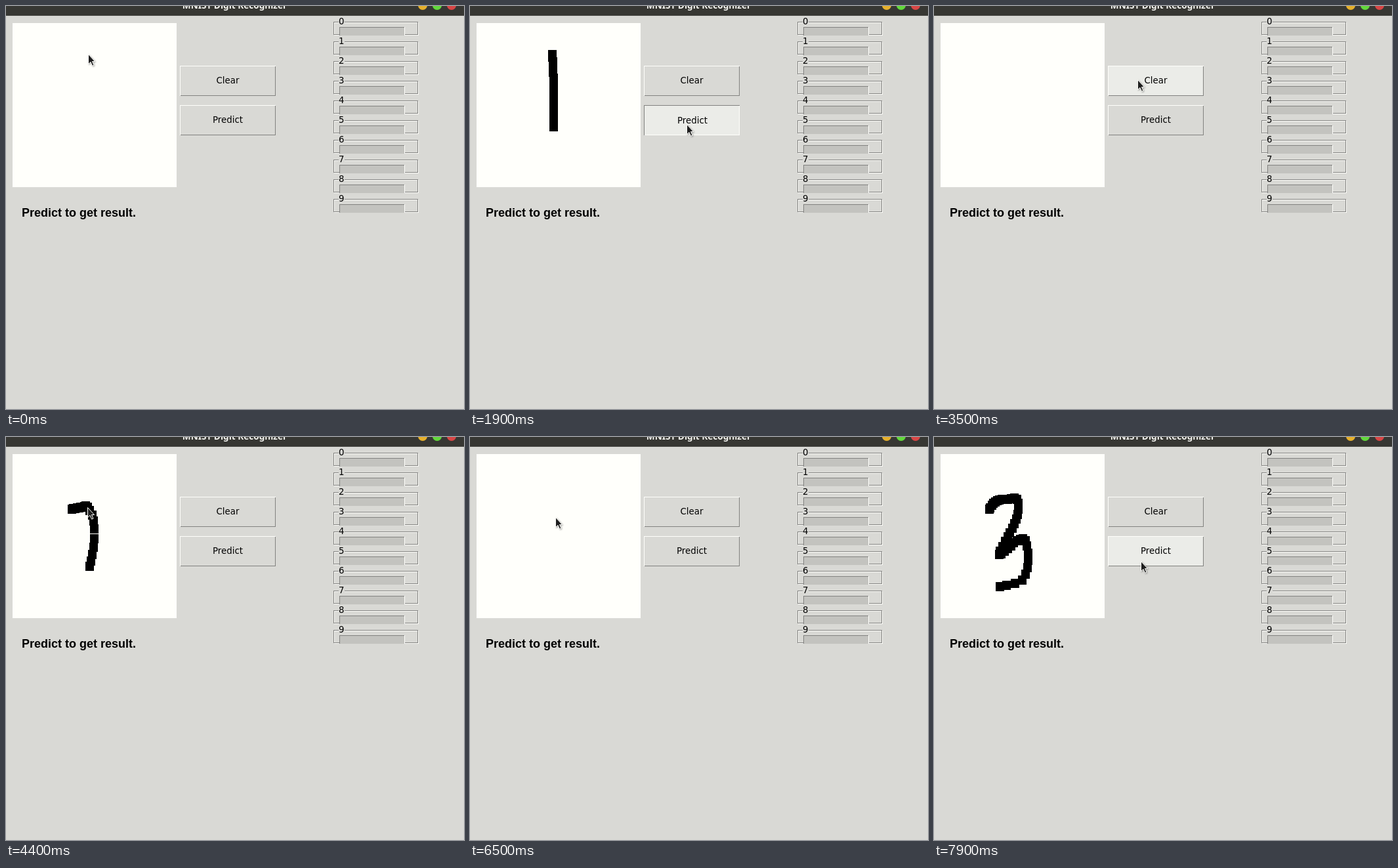
An HTML page that plays this animation: 698 by 614 pixels, repeating every 8000 ms.

```html
<!DOCTYPE html>
<html lang="en">
<head>
<meta charset="utf-8">
<title>MNIST Digit Recognizer</title>
<style>
  html, body { margin: 0; width: 100%; height: 100%; overflow: hidden; background: #d9d9d5; }
  svg { display: block; width: 698px; height: 614px; shape-rendering: crispEdges; }
  text { font: 13.33px "DejaVu Sans", sans-serif; fill: #000; }
  .mid { text-anchor: middle; }
  .title { font: 700 13.6px "Noto Sans", "Open Sans", sans-serif; fill: #f4f4f0; }
  .result { font: 700 18px "Liberation Sans", Arial, sans-serif; }
  .smooth { shape-rendering: geometricPrecision; }
  .dark { fill: #828280; }
  .light { fill: #fffffb; }
  .face { fill: #d9d9d5; }
  .trough { fill: #c3c3bf; }
  .hover .face, .down .face { fill: #ebece8; }
  .down .dark { fill: #fffffb; }
  .down .light { fill: #828280; }
  .down text { transform: translate(1px, 1px); }
  .bar { fill: #4a6984; }
  .bar-light { fill: #8fa4b6; }
  .bar-dark { fill: #25364a; }
  #cursor { filter: drop-shadow(1px 1px 1px rgba(0, 0, 0, .35)); }
</style>
</head>
<body>
<svg viewBox="0 0 698 614">
  <rect width="698" height="614" fill="#d9d9d5"/>
  <rect width="698" height="15" fill="#373733"/>
  <rect y="14" width="698" height="1" fill="#4a4a46"/>
  <text class="title mid" x="348.5" y="4">MNIST Digit Recognizer</text>
  <g class="smooth">
    <circle cx="635" cy="-1" r="7" fill="#e6b02c"/>
    <circle cx="657" cy="-1" r="7" fill="#62d83c"/>
    <circle cx="679" cy="-1" r="7" fill="#d84646"/>
  </g>
  <rect x="10" y="26" width="250" height="250" fill="#fffffb"/>
  <path id="ink"/>
  <g id="buttons"></g>
  <text id="result" class="result mid" x="111" y="321"></text>
  <g id="bars"></g>
  <path id="cursor" class="smooth" fill="#1e1e1e" stroke="#fffffb" stroke-linejoin="round"
        d="M.5 .5V15.6L4 12.4 6.6 18.2 9 17.2 6.5 11.5H10.6Z"/>
</svg>
<script>
const LOOP = 8000, TICK = 100, PRESS = 200;
const STAMPS = 3; // pen stamps per curve segment
const $ = id => document.getElementById(id);
const clamp = v => Math.min(1, Math.max(0, v));
const box = (cls, x, y, w, h) =>
  `<rect class="${cls}" x="${x}" y="${y}" width="${w}" height="${h}"/>`;

// One round per digit: pen curve and times, button presses, outcome
const rounds = [
  { start: 0, pen: [800, 1200], predict: 1900, shown: 2300, clear: 3300, digit: 1, scores: { 1: 1 },
    curve: [[125, 74], [126, 92], [127, 120], [127, 150], [127, 184]] },
  { start: 3500, pen: [4300, 4800], predict: 5200, shown: 5500, clear: 6100, digit: 2, scores: { 1: .04, 2: 1 },
    curve: [[100, 110], [108, 108], [116, 107], [124, 107], [133, 128], [133, 168], [127, 197], [120, 204],
      [114, 213], [112, 222], [119, 218], [130, 215], [141, 212], [152, 210], [163, 209], [174, 209]] },
  { start: 6300, pen: [6800, 7500],
    curve: [[84, 110], [90, 101], [99, 96], [112, 95], [126, 95], [127, 118], [119, 139], [108, 159],
      [99, 179], [112, 170], [126, 158], [139, 158], [143, 188], [134, 218], [100, 228]] }
];

// Pointer moves between drawings: from, until, target
const moves = [
  [500, 600, 125, 74], [1400, 1700, 330, 180],
  [2700, 2800, 264, 175], [2800, 2900, 219, 150], [2900, 3100, 310, 112],
  [3500, 3600, 152, 126], [3700, 3800, 111, 123], [3900, 4100, 100, 110],
  [4800, 5000, 206, 195], [5100, 5200, 321, 181],
  [5700, 5900, 223, 140], [5900, 6000, 300, 112],
  [6300, 6500, 130, 122], [6500, 6700, 84, 110], [7600, 7900, 315, 189]
];

// Catmull-Rom point, u counted in segments
function curvePoint(points, u) {
  const last = points.length - 1;
  const i = Math.min(Math.floor(u), last - 1), f = u - i;
  const [a, b, c, d] = [i - 1, i, i + 1, i + 2].map(k => points[Math.min(last, Math.max(0, k))]);
  return [0, 1].map(n => b[n] + f / 2 * (c[n] - a[n] +
    f * (2 * a[n] - 5 * b[n] + 4 * c[n] - d[n] + f * (3 * (b[n] - c[n]) + d[n] - a[n]))));
}

const penProgress = ({ pen: [from, to], curve }, time) =>
  clamp((time - from) / (to - from)) * (curve.length - 1);

// The ink runs one tick ahead of the pointer
function inkPath(round, time) {
  const u = penProgress(round, time + TICK);
  let d = '';
  for (let s = 0; u && s <= u * STAMPS; s++) {
    const [x, y] = curvePoint(round.curve, s / STAMPS).map(Math.round);
    d += `M${x - 6} ${y - 7}h13v14h-13z`;
  }
  return d;
}

function pointerAt(time) {
  const drawing = rounds.find(({ pen }) => time >= pen[0] && time <= pen[1]);
  if (drawing) return curvePoint(drawing.curve, penProgress(drawing, time)).map(Math.round);
  let pos = [125, 73], since = 0;
  for (const [from, to, ...target] of moves) {
    if (time < from) break;
    const drawn = rounds.find(({ pen }) => pen[1] > since && pen[1] <= from);
    if (drawn) pos = drawn.curve.at(-1);
    const f = clamp((time - from) / (to - from));
    pos = pos.map((p, n) => Math.round(p + (target[n] - p) * f));
    since = to;
  }
  const done = rounds.find(({ pen }) => pen[1] > since && pen[1] <= time);
  return done ? done.curve.at(-1) : pos;
}

function buttonState(name, top, [x, y], time) {
  if (rounds.some(r => time >= r[name] && time < r[name] + PRESS)) return 'down';
  return x >= 265 && x < 411 && y >= top && y < top + 46 ? 'hover' : '';
}

const button = (label, y) => `<g>${box('light', 265, y, 146, 46)}${box('dark', 266, y + 1, 145, 45)}` +
  `${box('face', 266, y + 1, 144, 44)}<text class="mid" x="338" y="${y + 27}">${label}</text></g>`;

function row(digit) {
  const y = 24 + 30 * digit;
  return box('light', 500, y + 1, 129, 20) + box('dark', 499, y, 129, 20) +
    box('light', 500, y + 1, 127, 18) + box('face', 501, y + 2, 126, 17) +
    box('face', 507, y - 6, 9, 14) +
    box('light', 508, y + 8, 100, 13) + box('dark', 508, y + 8, 99, 13) +
    box('trough', 509, y + 9, 98, 12) +
    `<g class="fill"></g><text x="507" y="${y + 4}">${digit}</text>`;
}

function fill(digit, score) {
  if (!score) return '';
  const y = 33 + 30 * digit, w = Math.round(98 * score);
  return box('bar-dark', 509, y, w, 12) + box('bar-light', 509, y, w - 1, 11) +
    box('bar', 510, y + 1, w - 2, 10);
}

$('buttons').innerHTML = button('Clear', 91) + button('Predict', 151);
$('bars').innerHTML = Array.from({ length: 10 }, (_, digit) => row(digit)).join('');
const [clear, predict] = $('buttons').children;
const fills = document.querySelectorAll('.fill');

function render(time) {
  const round = rounds.findLast(r => r.start <= time);
  const pointer = pointerAt(time);
  const solved = time >= round.shown;
  $('ink').setAttribute('d', inkPath(round, time));
  $('cursor').setAttribute('transform', `translate(${pointer})`);
  clear.setAttribute('class', buttonState('clear', 91, pointer, time));
  predict.setAttribute('class', buttonState('predict', 151, pointer, time));
  $('result').textContent = solved ? `Prediction : ${round.digit}` : 'Predict to get result.';
  fills.forEach((el, digit) => { el.innerHTML = solved ? fill(digit, round.scores[digit]) : ''; });
}

const begin = performance.now();
let shown = -1;
function draw() {
  const time = Math.floor((performance.now() - begin) % LOOP / TICK) * TICK;
  if (time !== shown) render(shown = time);
  requestAnimationFrame(draw);
}
draw();
</script>
</body>
</html>
```
